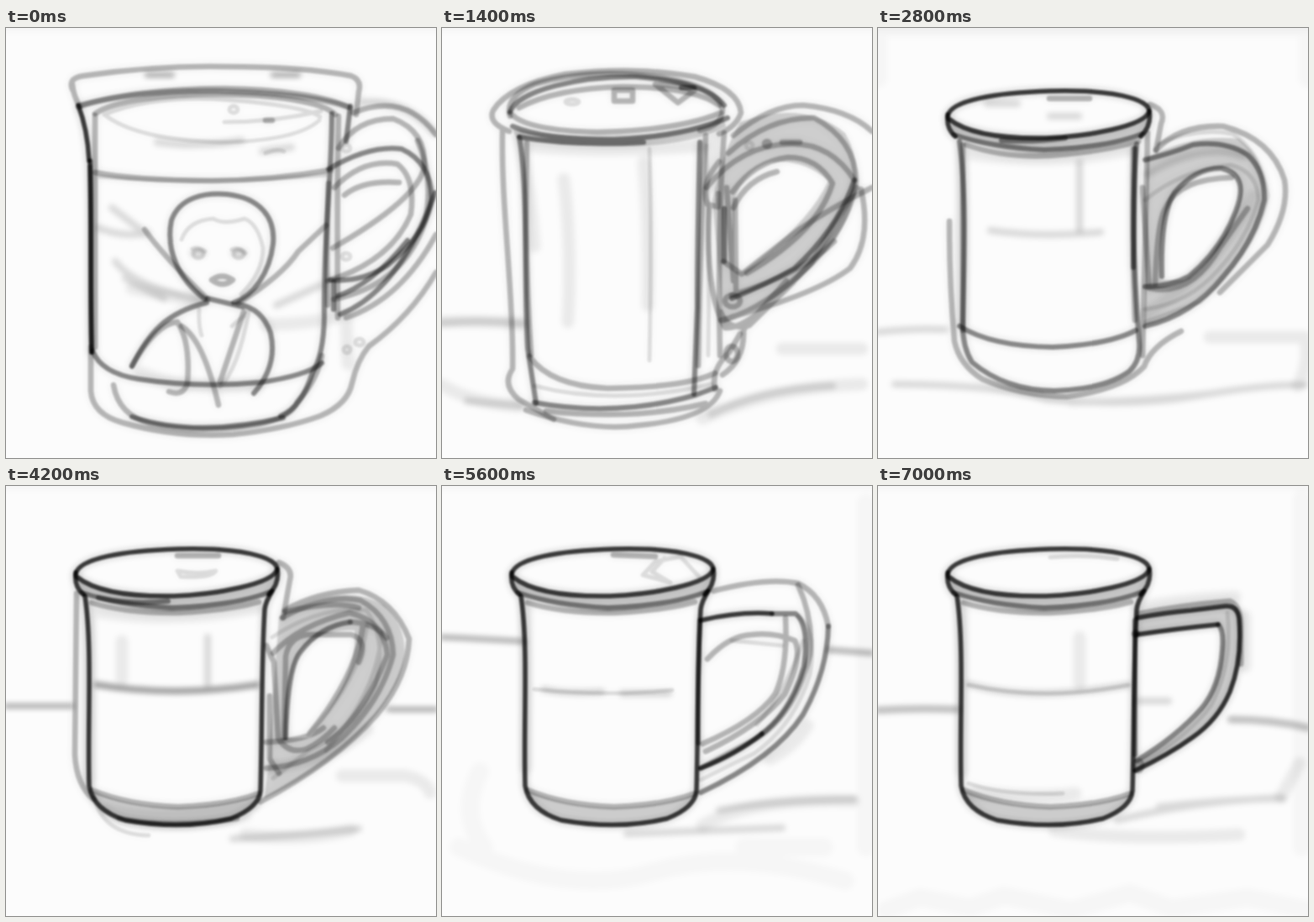
An HTML page that plays this animation: 512 by 512 pixels, repeating every 8.4 s.

```html
<!DOCTYPE html>
<html lang="en">
<head>
<meta charset="utf-8">
<title>Mug sketches</title>
<style>
html, body { margin: 0; width: 100%; height: 100%; overflow: hidden; background: #fcfcfc; }
svg { display: block; width: 100%; height: 100%; }
path, ellipse, rect { fill: none; stroke: #000; stroke-linecap: round; stroke-linejoin: round; }
.frame { visibility: hidden; animation: show 8.4s step-end infinite; animation-delay: calc(var(--i) * 1.4s - 8.4s); }
@keyframes show { 0% { visibility: visible; } 16.666%, 100% { visibility: hidden; } }
.lines { filter: url(#pencil); }
.smudges { filter: url(#soft); }
.smudges * { stroke-width: 8; stroke-opacity: .14; }
.smudges .strong { stroke-width: 6; stroke-opacity: .33; }
.smudges .wide { stroke-width: 15; stroke-opacity: .07; }
.smudges .haze { stroke-width: 22; stroke-opacity: .025; }
/* pencil pressure, from faint to dark */
.faint { stroke-width: 5; stroke-opacity: .11; }
.light { stroke-width: 6.5; stroke-opacity: .25; }
.mid { stroke-width: 6; stroke-opacity: .42; }
.dark { stroke-width: 5.5; stroke-opacity: .74; }
.tone { fill: #000; fill-opacity: .14; fill-rule: evenodd; stroke: none; }
</style>
</head>
<body>
<svg viewBox="0 0 512 512" preserveAspectRatio="none">
<defs>
  <filter id="pencil" filterUnits="userSpaceOnUse" x="0" y="0" width="512" height="512" color-interpolation-filters="sRGB">
    <feGaussianBlur in="SourceGraphic" stdDeviation="1.3" result="core"/>
    <feGaussianBlur in="SourceGraphic" stdDeviation="4.5"/>
    <feComponentTransfer result="halo"><feFuncA type="linear" slope=".35"/></feComponentTransfer>
    <feMerge><feMergeNode in="halo"/><feMergeNode in="core"/></feMerge>
  </filter>
  <filter id="soft" filterUnits="userSpaceOnUse" x="0" y="0" width="512" height="512">
    <feGaussianBlur stdDeviation="3"/>
  </filter>
  <g id="rim">
    <path class="dark" d="M83 105C86 86 140 77 205 75C278 73 322 84 323 99C318 117 250 129 200 131C145 132 105 125 84 108"/>
    <path class="dark" d="M83 103Q81 120 92 129M323 99Q326 116 313 129"/>
    <path class="mid" d="M90 127Q135 142 198 145Q275 142 315 126"/>
    <path class="tone" d="M87 115Q140 134 200 133Q285 128 322 108L314 128Q270 146 198 150Q130 148 89 126Z"/>
  </g>
  <g id="body">
    <path class="dark" d="M94 131C103 190 97 280 99 357Q104 386 142 398Q210 410 268 396Q301 383 303 363C305 300 304 210 308 147Q309 138 317 125"/>
    <path class="light" d="M102 362Q145 380 205 382Q265 380 301 366"/>
    <path class="tone" d="M102 362Q145 382 205 383Q265 381 301 367Q292 388 268 396Q206 411 142 398Q113 389 102 362Z"/>
    <path class="light" d="M102 139Q145 152 205 151Q265 148 301 138"/>
  </g>
</defs>

<g class="smudges"><path class="haze" d="M0 -6H512"/></g>

<g class="frame" style="--i:0">
  <g class="smudges">
    <path d="M110 238Q140 250 168 244M126 214L160 240M130 278Q155 310 235 324M142 298L188 322"/>
    <path class="wide" d="M310 353Q350 354 395 344M150 310L225 325M405 345L407 400M160 410Q210 433 300 425"/>
    <path d="M180 136Q225 143 280 134M305 147L340 142M223 268H234M272 268H283M425 88Q475 84 510 125M322 330L375 306"/>
    <path class="strong" d="M168 56H198M318 56H348"/>
  </g>
  <g class="lines">
    <path class="light" d="M80 75Q72 60 92 57C155 48 205 45 260 46C320 46 370 49 411 57Q424 62 420 76L417 103M79 67Q80 80 88 94"/>
    <path class="light" d="M86 94C125 80 190 72 260 72C325 73 382 81 410 95M106 102C130 86 190 79 250 79C320 79 377 88 392 103"/>
    <path class="light" d="M88 92Q155 74 250 75Q360 78 407 94"/>
    <path class="faint" d="M117 103Q155 133 255 136Q345 135 373 110M117 103Q180 78 270 86T374 106M260 112Q320 112 375 99"/>
    <path class="dark" d="M86 92Q97 120 99 158"/>
    <path class="dark" d="M100 158C102 230 100 310 102 386"/>
    <path class="mid" d="M100 165C102 230 100 310 102 386"/>
    <path class="light" d="M106 104V380M101 380V432Q103 460 139 470Q202 488 270 484Q330 478 374 462Q407 448 412 423Q418 396 432 379Q482 343 512 291"/>
    <path class="mid" d="M388 102C388 180 378 240 379 344Q378 390 365 410Q352 452 327 462"/>
    <path class="light" d="M396 105Q394 185 395 345M384 185Q381 260 383 330M128 425Q134 461 172 471Q230 484 300 472Q340 464 347 445Q370 420 376 390"/>
    <path class="mid" d="M103 384Q113 411 158 418Q230 429 302 422Q358 414 376 399M150 463Q226 488 330 464"/>
    <path class="light" d="M106 172Q150 181 245 182Q320 181 387 169"/>
    <path class="faint" d="M112 177Q240 187 380 175"/>
    <path class="mid" d="M237 323C204 298 190 263 197 229C207 201 237 196 263 198C302 202 321 225 318 257C314 292 294 319 271 327"/>
    <path class="faint" d="M209 252Q217 229 247 227Q259 235 284 227Q300 233 306 262Q306 291 280 317M222 263Q229 260 237 266M269 264Q277 260 285 268"/>
    <ellipse class="faint" cx="229" cy="269" rx="6" ry="5"/><ellipse class="faint" cx="277" cy="269" rx="6" ry="5"/>
    <path class="light" d="M245 300Q257 291 270 300Q258 310 245 300"/>
    <path class="mid" d="M240 322L282 332M150 403C169 364 190 339 239 327M277 329Q305 334 315 363Q324 402 295 435"/>
    <path class="light" d="M150 402Q179 352 204 350Q220 374 216 423Q211 439 194 433M165 240Q186 270 240 323M381 235L348 266Q329 295 276 328"/>
    <path class="faint" d="M230 335Q229 355 233 366M269 355L289 338Q277 405 255 427"/>
    <path class="light" d="M209 355Q235 371 253 449M283 338L255 421"/>
    <path class="light" d="M413 101Q475 76 512 127"/>
    <path class="light" d="M396 143Q417 108 461 108Q501 123 498 166Q490 204 389 262"/>
    <path class="mid" d="M384 168Q433 139 471 144Q506 160 507 203Q502 244 455 282Q425 303 386 300"/>
    <path class="light" d="M391 190Q425 155 466 162Q488 179 482 222Q458 278 383 301M403 199Q425 181 468 184M390 323Q474 306 499 230Q510 180 490 134M405 345Q470 323 512 246"/>
    <path class="mid" d="M398 341Q468 313 511 196M392 320Q436 306 478 253M390 335V302M410 93L405 135"/>
    <g class="faint"><ellipse cx="271" cy="97" rx="5" ry="4"/><ellipse cx="405" cy="143" rx="5" ry="4"/><ellipse cx="405" cy="272" rx="5" ry="4"/><ellipse cx="421" cy="374" rx="5" ry="4"/><ellipse cx="406" cy="383" rx="4" ry="4"/></g>
    <path class="light" d="M309 110H317"/><path class="faint" d="M309 149Q323 143 331 147"/>
  </g>
</g>

<g class="frame" style="--i:1">
  <g class="smudges">
    <path class="wide" d="M0 350Q50 348 95 352M0 425Q30 445 90 450M310 465Q390 428 500 424M405 382H500"/>
    <path d="M0 351Q50 347 95 352M30 444L95 450M320 460Q380 430 465 426"/>
    <path class="wide" d="M145 180Q155 260 150 350M240 160Q247 240 245 330M92 130Q105 190 110 260M325 130V190M100 140Q190 150 310 140"/>
  </g>
  <g class="lines">
    <path class="tone" d="M84 120Q130 130 205 128Q285 126 335 105L338 118Q290 142 205 141Q130 140 88 130ZM355 112Q430 85 480 125Q512 180 470 250Q420 320 335 352L322 205Q335 145 355 112ZM348 205V290L358 290Q435 235 460 182Q430 155 390 160Q360 170 348 205Z"/>
    <path class="light" d="M80 123Q54 113 61 98Q80 68 147 55Q230 45 301 58Q354 73 356 101Q350 118 330 126M72 123C70 210 86 322 84 406Q71 425 91 442L133 466"/>
    <path class="light" d="M81 105Q75 82 110 67Q174 48 254 58Q328 68 334 97Q334 116 307 122"/>
    <path class="mid" d="M81 100C90 74 165 57 231 58Q314 64 336 92"/>
    <path class="light" d="M81 101Q99 122 185 124Q281 122 332 101M92 95Q135 72 215 70Q300 70 330 92"/>
    <path class="mid" d="M84 117Q121 133 205 133Q290 129 340 107M92 130Q160 141 240 136"/>
    <path class="mid" d="M92 130C103 191 97 294 102 381L112 447"/>
    <path class="mid" d="M307 136Q304 260 304 333L300 436"/>
    <path class="light" d="M101 137Q98 270 106 389M314 128Q307 250 305 402M336 125Q328 230 331 390"/>
    <path class="faint" d="M247 144Q250 250 247 396M315 140Q319 260 317 390M110 426Q204 451 321 424"/>
    <path class="light" d="M104 391Q129 426 197 429Q290 428 325 411"/>
    <path class="mid" d="M110 446Q208 464 302 437L326 428"/>
    <path class="light" d="M100 455Q175 481 235 473Q319 465 331 432M124 456Q228 468 314 447M325 430Q320 407 342 386L355 364"/>
    <path class="light" d="M347 128Q390 92 430 92Q484 97 512 123"/>
    <path class="light" d="M341 149Q389 106 443 107Q492 133 493 182Q485 241 423 296Q372 340 332 348M499 192Q512 251 486 286Q447 316 345 344"/>
    <path class="light" d="M315 190Q356 139 415 138Q463 137 491 181"/>
    <path class="mid" d="M491 181Q472 238 420 286Q385 306 345 322"/>
    <path class="light" d="M346 195Q372 159 412 154Q447 154 465 185Q448 243 363 292M347 214Q363 180 399 171"/>
    <path class="light" d="M512 190Q465 213 425 240L357 293L335 278"/>
    <path class="light" d="M339 190L347 301M349 205L350 312M345 318Q430 292 467 254"/>
    <path class="light" d="M330 159Q307 186 316 210L329 213V197M318 215Q313 315 337 357Q366 360 440 279L494 190M332 338Q340 361 366 354L418 303M334 413Q361 395 359 359L410 301"/>
    <path class="mid" d="M336 215V278"/>
    <ellipse class="light" cx="346" cy="325" rx="9" ry="7"/><ellipse class="light" cx="345" cy="388" rx="7" ry="9"/>
    <rect class="light" x="205" y="74" width="22" height="13"/><path class="light" d="M254 67L281 89L301 74Q280 67 254 67"/>
    <ellipse class="faint" cx="155" cy="88" rx="8" ry="3"/><ellipse class="faint" cx="366" cy="140" rx="4" ry="4"/><ellipse class="light" cx="387" cy="138" rx="3" ry="3"/><path class="light" d="M405 136H426"/>
    <path class="mid" d="M285 71H300"/>
  </g>
</g>

<g class="frame" style="--i:2">
  <g class="smudges">
    <path class="haze" d="M0 60V0H512V60"/>
    <path d="M240 160V240M130 90H166M0 362Q45 357 80 359M320 174Q385 136 435 153"/>
    <path class="wide" d="M395 368H508Q515 398 500 426M112 150Q210 164 300 145M320 340Q410 280 446 200M100 140V350"/>
    <path d="M20 424Q145 425 200 442Q300 452 380 438T508 425M230 446Q320 444 400 435"/>
    <path d="M134 241Q195 250 265 243M205 105H239"/>
  </g>
  <g class="lines">
    <use href="#rim"/>
    <path class="tone" d="M320 155Q375 125 430 132Q465 160 460 205Q445 260 400 305Q360 345 318 355ZM336 300Q335 225 353 196Q379 166 415 167Q440 178 426 218Q405 270 365 300Z"/>
    <path class="mid" d="M97 135C106 200 102 290 101 350Q100 379 112 398Q151 431 210 432Q270 430 299 409Q313 396 311 374M308 138C301 220 305 300 311 374"/>
    <path class="light" d="M101 139V360M304 144Q302 245 306 348"/>
    <path class="mid" d="M97 355Q135 379 208 380Q275 377 307 360M306 143L304 285"/>
    <path class="light" d="M85 230Q85 307 91 373Q97 401 124 418Q170 438 225 439Q292 430 317 403Q325 379 361 361M324 91Q344 98 337 114L331 146"/>
    <path class="light" d="M105 139Q150 155 205 152Q270 147 310 135M204 84H252"/>
    <path class="mid" d="M147 134Q188 136 223 131"/>
    <path class="mid" d="M318 157Q350 149 375 139Q414 134 440 151Q461 171 460 205Q449 253 411 296Q374 342 318 355"/>
    <path class="light" d="M331 145Q360 115 411 117Q469 132 484 181Q490 216 464 258L407 315"/>
    <path class="faint" d="M334 138Q379 118 422 126Q457 148 464 200Q450 265 384 326L318 350M318 205Q359 170 420 163Q452 171 453 205Q440 250 405 288Q370 328 318 335"/>
    <path class="light" d="M330 305Q332 230 343 213Q358 180 421 178M325 310Q374 320 408 260L440 215M315 190L323 310"/>
    <path class="mid" d="M338 296Q336 222 353 196Q379 166 409 167Q443 175 426 218Q408 265 370 296Q348 308 318 308"/>
    <path class="light" d="M321 125L315 390"/>
  </g>
</g>

<g class="frame" style="--i:3">
  <g class="smudges">
    <path class="strong" d="M0 262H78M456 266H512M108 237Q200 251 299 237"/>
    <path d="M240 180V236M108 236Q200 253 299 236M270 420Q350 416 420 408"/>
    <path class="wide" d="M112 150Q200 164 300 145M285 415Q350 424 410 410M138 185V230M315 335Q380 330 430 290M100 140V350"/>
    <path class="wide" d="M130 392Q190 412 285 392M120 385Q190 402 295 380M400 345H475Q500 350 505 365"/>
  </g>
  <g class="lines">
    <use href="#rim"/><use href="#body"/>
    <path class="tone" d="M325 155Q400 112 450 142Q490 180 465 235Q420 320 308 372L312 335ZM335 300Q333 225 352 196Q374 170 415 172Q420 225 362 300Z"/>
    <path class="light" d="M84 128Q83 235 82 320Q84 356 104 373M135 396Q194 408 275 396M325 91Q342 98 338 112L330 157"/>
    <path class="faint" d="M105 370Q115 415 170 416"/>
    <path class="light" d="M204 83H253"/>
    <path class="faint" d="M204 101Q230 106 250 101Q245 110 208 108Z"/>
    <path class="mid" d="M110 133Q150 142 193 137"/>
    <path class="light" d="M332 148Q370 126 420 124Q462 136 480 182Q478 229 441 273Q393 328 303 376"/>
    <path class="light" d="M329 157Q380 128 422 136Q460 157 461 201Q446 258 399 301Q361 333 310 336"/>
    <path class="faint" d="M317 180Q374 142 429 148Q454 181 440 237Q419 289 359 316L318 348M430 165Q422 230 360 296M447 175Q443 244 381 315"/>
    <path class="light" d="M331 300L333 203Q337 180 359 177H411Q432 183 420 210M318 199Q350 165 409 151Q451 161 454 201Q427 273 383 305"/>
    <path class="mid" d="M333 300Q335 215 351 197Q374 167 410 162"/>
    <path class="light" d="M410 162Q440 163 453 181M310 305Q360 303 378 288M332 150Q390 136 420 145M425 165Q418 225 362 294"/>
    <path class="light" d="M310 190L319 210L324 300Q336 320 358 313Q375 305 391 288M314 250V325L325 342"/>
  </g>
</g>

<g class="frame" style="--i:4">
  <g class="smudges">
    <path class="strong" d="M0 180Q45 182 97 185M460 195L512 199"/>
    <path d="M122 242Q145 248 190 245M215 247H270M330 386Q395 374 490 373M220 414Q310 411 405 407"/>
    <path class="wide" d="M310 404Q370 371 490 375M435 285Q420 310 390 325M100 139V335"/>
    <path class="haze" d="M45 340Q20 390 50 430M20 430Q150 490 250 460T480 470M360 430H455M505 20V430"/>
  </g>
  <g class="lines">
    <use href="#rim"/><use href="#body"/>
    <path class="faint" d="M110 242Q195 251 274 243M345 184L405 190"/>
    <path class="mid" d="M307 160Q304 240 305 306"/>
    <path class="faint" d="M239 106L254 90L284 84L306 108M239 106L272 115L250 102L265 86"/>
    <path class="light" d="M204 82L254 84M323 125Q388 108 424 116Q453 130 460 167"/>
    <path class="mid" d="M460 167Q459 220 430 272Q397 323 308 365"/>
    <path class="light" d="M424 118Q443 160 438 201Q420 275 370 303L308 336"/>
    <path class="faint" d="M424 155Q447 171 438 225Q420 284 372 318L308 350M375 284Q408 248 430 184"/>
    <path class="light" d="M310 307Q375 279 397 247Q412 214 409 157M316 206Q342 178 369 177Q395 174 420 184Q430 203 408 248Q380 285 314 316"/>
    <path class="dark" d="M308 160Q355 149 393 152M308 336Q351 319 381 295"/>
    <path class="mid" d="M393 152H421Q438 166 431 215Q416 268 381 295"/>
  </g>
</g>

<g class="frame" style="--i:5">
  <g class="smudges">
    <path d="M0 267Q45 264 94 266M420 278Q470 278 512 288"/>
    <path d="M0 267Q45 264 94 266M420 278Q470 278 512 288M108 236Q145 247 190 247T298 237M310 256H346M285 398Q370 376 480 371M335 382Q410 373 482 372"/>
    <path class="wide" d="M240 180V235M210 410Q300 423 430 415M115 365Q185 373 235 366M480 370L502 330M100 139V340M310 145Q380 133 425 132M437 155V215"/>
    <path class="haze" d="M505 15V430M10 505L50 490L110 502L150 488L230 505L300 485L350 503L440 490L512 505"/>
  </g>
  <g class="lines">
    <use href="#rim"/><use href="#body"/>
    <path class="faint" d="M108 237Q200 257 298 237M108 354Q150 369 220 366M205 85Q245 81 285 87"/>
    <path class="tone" d="M308 157L416 143Q429 144 430 164V205Q426 251 396 285Q361 316 307 338L308 327Q370 296 393 255Q410 223 411 178Q410 166 400 165L308 178Z"/>
    <path class="dark" d="M309 157Q340 151 373 148L414 143Q428 142 430 158Q434 207 419 245Q405 278 375 299Q346 320 306 339M308 177Q355 170 405 165"/>
    <path class="mid" d="M405 165Q412 171 410 195Q407 239 385 265Q355 299 308 327"/>
    <path class="light" d="M311 152Q360 142 419 137Q431 142 432 163V212"/>
    <path class="mid" d="M306 160V320"/>
    <path class="faint" d="M416 151Q423 212 397 261Q373 295 315 329"/>
    <ellipse class="mid" cx="307" cy="176" rx="2" ry="2"/><ellipse class="light" cx="310" cy="333" rx="4" ry="6"/>
  </g>
</g>
</svg>
</body>
</html>
```
